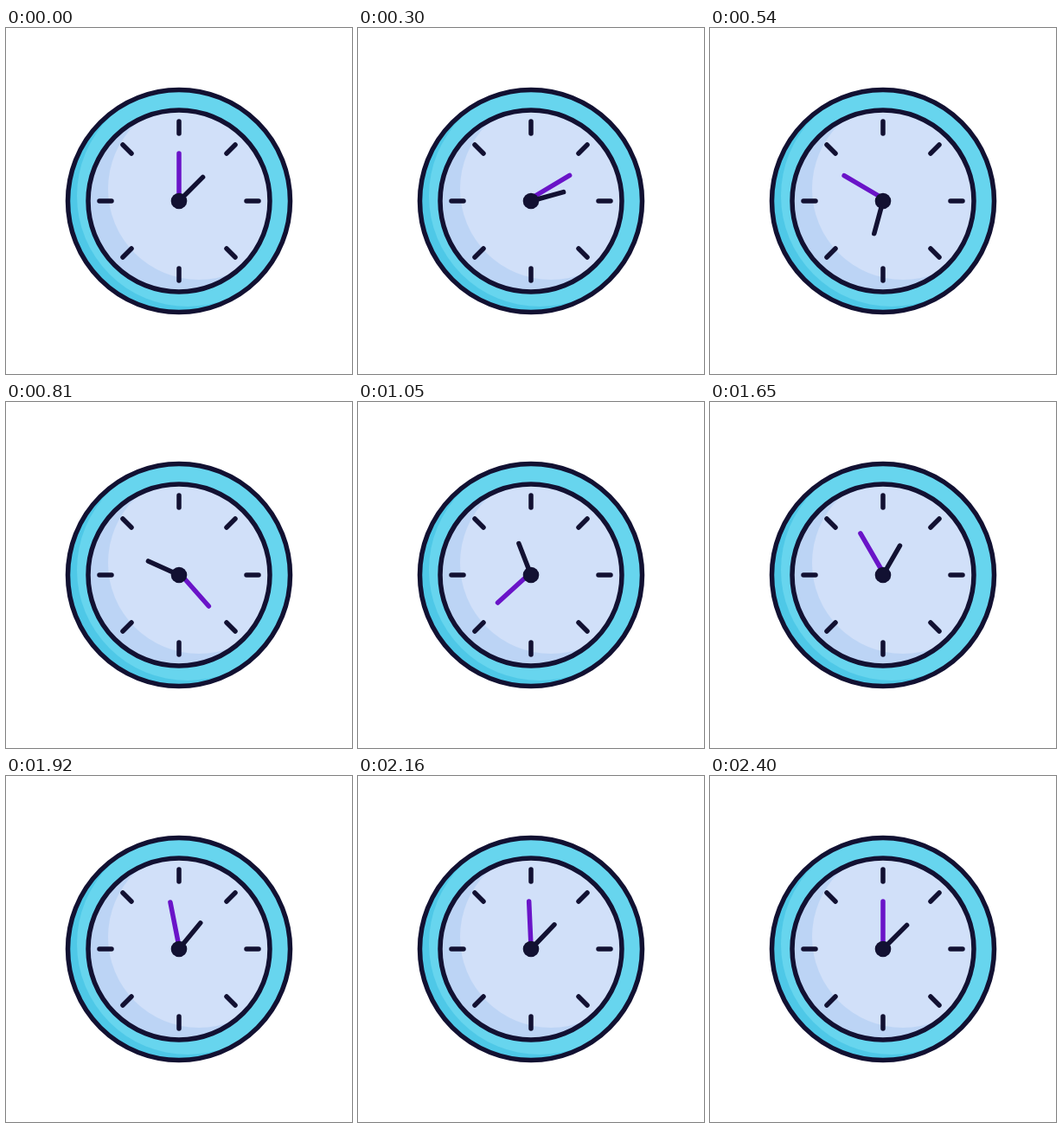
An HTML page that plays this animation: 400 by 400 pixels, repeating every 4460 ms.

```html
<!DOCTYPE html>
<html lang="en">
<head>
<meta charset="utf-8">
<title>Clock</title>
<style>
  html, body { margin: 0; height: 100%; overflow: hidden; background: #fff; }
  svg { display: block; width: 100%; height: 100%; }
  .line { fill: none; stroke: #121132; stroke-width: 5.5; stroke-linecap: round; }
</style>
</head>
<body>
<svg viewBox="0 0 400 400">
  <clipPath id="rim"><circle cx="200" cy="200" r="128.5"/></clipPath>
  <clipPath id="face"><circle cx="200" cy="200" r="105"/></clipPath>

  <g clip-path="url(#rim)">
    <circle cx="200" cy="200" r="128.5" fill="#4ec8e7"/>
    <circle cx="210" cy="194" r="128" fill="#67d5ee"/>
  </g>
  <g clip-path="url(#face)">
    <circle cx="200" cy="200" r="105" fill="#bcd4f5"/>
    <circle cx="223" cy="186" r="105" fill="#d1e0f9"/>
  </g>
  <g class="line">
    <circle cx="200" cy="200" r="128.5"/>
    <circle cx="200" cy="200" r="105"/>
    <path d="M200 108v14M200 278v14M108 200h14M278 200h14M135 135l10 10M255 255l10 10M265 135l-10 10M145 255l-10 10"/>
  </g>

  <path id="minute" class="line" style="stroke: #6a14c8" d="M200 197v-52"/>
  <path id="hour" class="line" d="M200 200v-39"/>
  <circle cx="200" cy="200" r="9.3" fill="#121132"/>
</svg>
<script>
  const LOOP = 4460, SPIN = 2400, STEP = 30;
  const minute = document.getElementById('minute');
  const hour = document.getElementById('hour');

  // cubic-bezier(1/3, 0, 0, 1), solved for its parameter by bisection
  function ease(x) {
    if (x >= 1) return 1;
    let lo = 0, hi = 1;
    for (let i = 0; i < 30; i++) {
      const s = (lo + hi) / 2;
      if (s - 2 * s * s + 2 * s ** 3 < x) lo = s; else hi = s;
    }
    return lo * lo * (3 - 2 * lo);
  }

  function turn(hand, angle, pivotY) {
    hand.setAttribute('transform', `rotate(${angle} 200 ${pivotY})`);
  }

  function draw(now) {
    const t = Math.floor((now % LOOP) / STEP) * STEP;
    const p = ease(t / SPIN);
    turn(minute, 720 * p, 197);
    turn(hour, 45 + 360 * p, 200);
  }

  const start = performance.now();
  function frame() {
    draw(performance.now() - start);
    requestAnimationFrame(frame);
  }
  frame();
</script>
</body>
</html>
```
